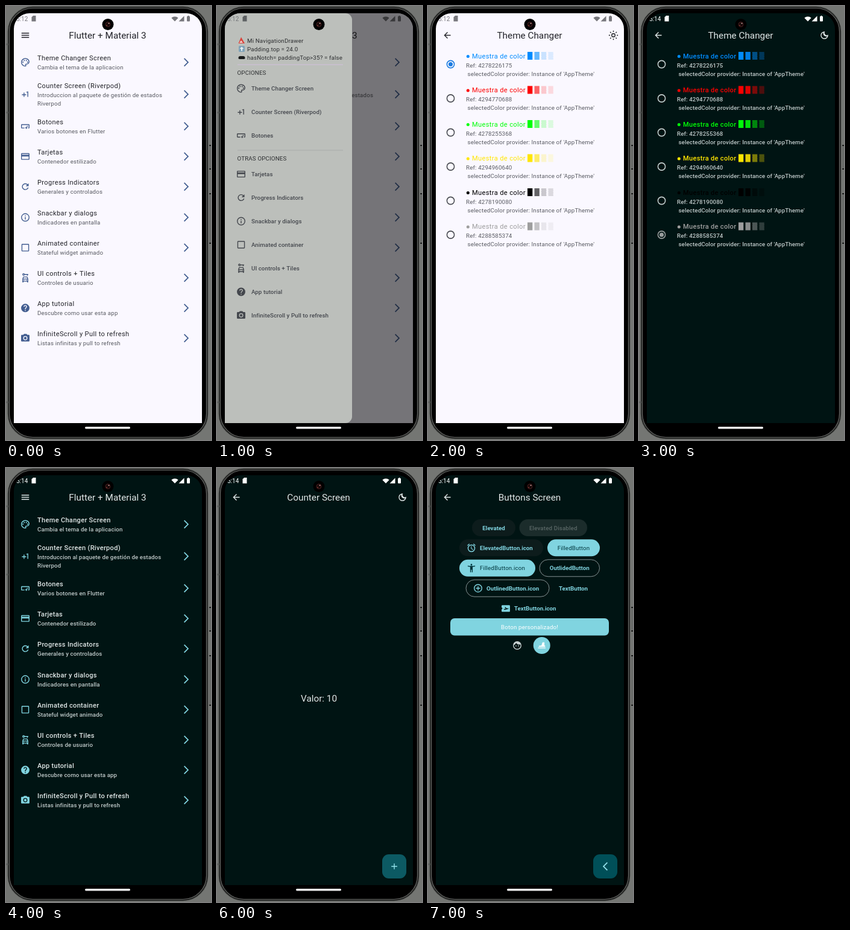
Write an HTML page with a canvas that moves like this. It is 340 by 719 pixels and loops after 8 s.

```html
<!DOCTYPE html>
<html lang="es">
<head>
<meta charset="utf-8">
<title>Material 3 demo</title>
<style>
html, body { margin: 0; width: 100%; height: 100%; overflow: hidden; background: #747673; }
canvas { display: block; width: 340px; height: 719px; }
</style>
</head>
<body>
<canvas id="stage"></canvas>
<script>
const W = 340, H = 719, STEP = 1000;
const canvas = document.getElementById('stage');
const ctx = canvas.getContext('2d');
const ratio = window.devicePixelRatio || 1;
canvas.width = W * ratio;
canvas.height = H * ratio;

const LIGHT = { bg: '#faf8ff', text: '#24252a', sub: '#585a61', accent: '#435e91', radio: '#4a4c53',
  picked: '#1a7be0', status: '#77777c', time: '5:12', mode: 'sun', shades: [1, .6, .16, .1],
  heading: { size: 11.12, gap: .35 }, body: { gap: .17 } };
const DARK = { bg: '#001413', text: '#e0e6e6', sub: '#c0c9c9', accent: '#80d4e0', radio: '#c3cccc',
  picked: '#9a9e9e', status: '#ffffff', time: '5:14', mode: 'moon', shades: [1, .88, .42, .25],
  heading: { size: 11.12, gap: .27, weight: 500 }, body: { gap: .1, weight: 500 } };

// Icons live on a 24-unit grid and are filled with the even-odd rule.
const disc = (x, y, r) => `M${x - r} ${y}a${r} ${r} 0 1 0 ${2 * r} 0a${r} ${r} 0 1 0 ${-2 * r} 0z`;
const ring = disc(12, 12, 10) + disc(12, 12, 8);
const icons = {
  menu: 'M3 18h18v-2H3zM3 13h18v-2H3zM3 6v2h18V6z',
  back: 'M20 11H7.83l5.59-5.59L12 4l-8 8 8 8 1.41-1.41L7.83 13H20z',
  next: 'M6.23 20.23 8 22l10-10L8 2 6.23 3.77 14.46 12z',
  prev: 'M17.77 3.77 16 2 6 12l10 10 1.77-1.77L9.54 12z',
  palette: 'M12 22C6.49 22 2 17.51 2 12S6.49 2 12 2s10 4.04 10 9c0 3.31-2.69 6-6 6h-1.77c-.28 0-.5.22-.5.5 0 .12.05.23.13.33.41.47.64 1.06.64 1.67A2.5 2.5 0 0 1 12 22zM12 4c-4.41 0-8 3.59-8 8s3.59 8 8 8c.28 0 .5-.22.5-.5a.54.54 0 0 0-.14-.35c-.41-.46-.63-1.05-.63-1.65a2.5 2.5 0 0 1 2.5-2.5H16c2.21 0 4-1.79 4-4 0-3.86-3.59-7-8-7z'
    + disc(6.5, 11.5, 1.5) + disc(9.5, 7.5, 1.5) + disc(14.5, 7.5, 1.5) + disc(17.5, 11.5, 1.5),
  plusOne: 'M10 8H8v4H4v2h4v4h2v-4h4v-2h-4zM14.5 6.08V7.9l2.5-.5V18h2V5z',
  button: 'M22 9v6c0 1.1-.9 2-2 2h-1v-2h1V9H4v6h6v2H4c-1.1 0-2-.9-2-2V9c0-1.1.9-2 2-2h16c1.1 0 2 .9 2 2zM14.5 19l1.09-2.41L18 15.5l-2.41-1.09L14.5 12l-1.09 2.41L11 15.5l2.41 1.09zM17 14l.62-1.38L19 12l-1.38-.62L17 10l-.62 1.38L15 12l1.38.62z',
  card: 'M20 4H4c-1.1 0-2 .9-2 2v12c0 1.1.9 2 2 2h16c1.1 0 2-.9 2-2V6c0-1.1-.9-2-2-2zM20 18H4v-6h16zM20 8H4V6h16z',
  refresh: 'M17.65 6.35C16.2 4.9 14.21 4 12 4c-4.42 0-8 3.58-8 8s3.58 8 8 8c3.73 0 6.84-2.55 7.73-6h-2.08c-.82 2.33-3.04 4-5.65 4-3.31 0-6-2.69-6-6s2.69-6 6-6c1.66 0 3.14.69 4.22 1.78L13 11h7V4z',
  info: ring + 'M11 7h2v2h-2zM11 11h2v6h-2z',
  box: 'M19 5v14H5V5zM19 3H5c-1.1 0-2 .9-2 2v14c0 1.1.9 2 2 2h14c1.1 0 2-.9 2-2V5c0-1.1-.9-2-2-2z',
  car: 'M10.83 3a3 3 0 1 0 0 2H16v2h2V5h1V3z' + disc(8, 4, 1)
    + 'M16.39 9H7.61c-.43 0-.81.28-.95.68l-1.66 5V21.5a1.5 1.5 0 0 0 3 0V21h8v.5a1.5 1.5 0 0 0 3 0v-6.82l-1.66-5c-.13-.4-.52-.68-.95-.68zM8.33 11h7.34l1 3H7.33zM17 19H7v-3h10z'
    + disc(9, 17.5, 1) + disc(15, 17.5, 1),
  help: disc(12, 12, 10) + 'M13 19h-2v-2h2zM15.07 11.25l-.9.92C13.45 12.9 13 13.5 13 15h-2v-.5c0-1.1.45-2.1 1.17-2.83l1.24-1.26c.37-.36.59-.86.59-1.41a2 2 0 0 0-4 0H8a4 4 0 0 1 8 0c0 .88-.36 1.68-.93 2.25z',
  camera: 'M9 2 7.17 4H4c-1.1 0-2 .9-2 2v12c0 1.1.9 2 2 2h16c1.1 0 2-.9 2-2V6c0-1.1-.9-2-2-2h-3.17L15 2z' + disc(12, 12, 5) + disc(12, 12, 3.2),
  sun: disc(12, 12, 5) + disc(12, 12, 3) + 'M1 11h3v2H1zM20 11h3v2h-3zM11 1h2v3h-2zM11 20h2v3h-2zM4.9 3.5l2.2 2.2-1.4 1.4-2.2-2.2zM18.3 16.9l2.2 2.2-1.4 1.4-2.2-2.2zM19.1 3.5l1.4 1.4-2.2 2.2-1.4-1.4zM5.7 16.9l1.4 1.4-2.2 2.2-1.4-1.4z',
  moon: 'M9.37 5.51A7.35 7.35 0 0 0 9.1 7.5a7.4 7.4 0 0 0 9.39 7.13A7 7 0 0 1 12 19c-3.86 0-7-3.14-7-7 0-2.93 1.81-5.45 4.37-6.49zM12 3a9 9 0 1 0 9 9c0-.46-.04-.92-.1-1.36a5.4 5.4 0 0 1-7.54-7.54c-.44-.06-.9-.1-1.36-.1z',
  alarm: 'M22 5.72l-4.6-3.86-1.29 1.53 4.6 3.86zM7.88 3.39 6.6 1.86 2 5.71l1.29 1.53zM12.5 8H11v6l4.75 2.85.75-1.23-4-2.37z' + disc(12, 13, 9) + disc(12, 13, 7),
  person: 'M20.5 6c-2.61.7-5.67 1-8.5 1s-5.89-.3-8.5-1L3 8c1.86.5 4 .83 6 1v13h2v-6h2v6h2V9c2-.17 4.14-.5 6-1z' + disc(12, 4, 2),
  addRing: ring + 'M13 7h-2v4H7v2h4v4h2v-4h4v-2h-4z',
  add: 'M19 13h-6v6h-2v-6H5v-2h6V5h2v6h6z',
  ticket: 'M20.2 4H4c-1.1 0-2 .9-2 2v4a2 2 0 0 1 0 4v4c0 1.1.9 2 2 2h16.2c1 0 1.8-.9 1.8-2V6c0-1.1-.8-2-1.8-2zM17.73 13.3l-8.86 2.36-1.66-2.88.93-.25 1.26.99 2.39-.64-2.4-4.16 1.4-.38 4.01 3.74 2.44-.65c.51-.14 1.04.17 1.18.68.13.51-.17 1.04-.69 1.19z',
  face: disc(12, 12, 10) + 'M12 20c-4.41 0-8-3.59-8-8 0-.29.02-.58.05-.86 2.36-1.05 4.23-2.98 5.21-5.37C11.07 8.33 14.05 10 17.42 10c.78 0 1.53-.09 2.25-.26.21.71.33 1.47.33 2.26 0 4.41-3.59 8-8 8z' + disc(9, 13, 1.25) + disc(15, 13, 1.25),
  sled: 'M2 19h20v2H2zM3 17l3-3h5l3-9h5v9h2v3z'
};
for (const key in icons) icons[key] = new Path2D(icons[key]);

function icon(name, x, y, color, size = 16.7) {
  ctx.save();
  ctx.translate(x - size / 2, y - size / 2);
  ctx.scale(size / 24, size / 24);
  ctx.fillStyle = color;
  ctx.fill(icons[name], 'evenodd');
  ctx.restore();
}

function text(str, x, y, color, { size = 9.73, weight = 400, gap = .17, align = 'left' } = {}) {
  ctx.font = `${weight} ${size}px Roboto, sans-serif`;
  ctx.letterSpacing = gap + 'px';
  ctx.textAlign = align;
  ctx.fillStyle = color;
  ctx.fillText(str, x, y);
}

function rect(x, y, w, h, color) {
  ctx.fillStyle = color;
  ctx.fillRect(x, y, w, h);
}

function round(x, y, w, h, r, fill, stroke, line = 1) {
  ctx.beginPath();
  ctx.roundRect(x, y, w, h, r);
  if (fill) { ctx.fillStyle = fill; ctx.fill(); }
  if (stroke) { ctx.strokeStyle = stroke; ctx.lineWidth = line; ctx.stroke(); }
}

function circle(x, y, r, fill, stroke, line = 1.6) {
  round(x - r, y - r, 2 * r, 2 * r, r, fill, stroke, line);
}

function shape(points, color) {
  ctx.beginPath();
  points.forEach(([x, y]) => ctx.lineTo(x, y));
  ctx.fillStyle = color;
  ctx.fill();
}

const menu = [
  ['palette', 'Theme Changer Screen', 'Cambia el tema de la aplicacion'],
  ['plusOne', 'Counter Screen (Riverpod)', 'Introduccion al paquete de gestión de estados', 'Riverpod'],
  ['button', 'Botones', 'Varios botones en Flutter'],
  ['card', 'Tarjetas', 'Contenedor estilizado'],
  ['refresh', 'Progress Indicators', 'Generales y controlados'],
  ['info', 'Snackbar y dialogs', 'Indicadores en pantalla'],
  ['box', 'Animated container', 'Stateful widget animado'],
  ['car', 'UI controls + Tiles', 'Controles de usuario'],
  ['help', 'App tutorial', 'Descubre como usar esta app'],
  ['camera', 'InfiniteScroll y Pull to refresh', 'Listas infinitas y pull to refresh']
];

function appBar(theme, title, leading, action) {
  text(title, 168.5, 54, theme.text, { size: 15.3, gap: 0, align: 'center' });
  icon(leading, 32, 48.5, theme.text);
  if (action) icon(action, 307.5, 48.5, theme.text);
}

function status(theme) {
  const c = theme.status;
  text(theme.time, 17, 24.5, c, { size: 10, gap: 0 });
  shape([[45, 16], [49.5, 16], [49.5, 25.5], [42.5, 25.5], [42.5, 18.5]], c);
  ctx.beginPath();
  ctx.moveTo(280, 25.5);
  ctx.arc(280, 25.5, 8, -Math.PI * .75, -Math.PI * .25);
  ctx.fillStyle = c;
  ctx.fill();
  shape([[295.5, 16.5], [295.5, 25.5], [286.5, 25.5]], c);
  round(300, 17, 5, 8.5, 1, c);
  rect(301.5, 16, 2, 1.5, c);
}

function home(theme) {
  appBar(theme, 'Flutter + Material 3', 'menu');
  menu.forEach(([name, title, sub, more], i) => {
    const y = i === 0 ? 93 : i === 1 ? 146 : Math.round(199 + (i - 2) * 50.2);
    const top = i === 1 ? 136 : y - 3;
    icon(name, 32, y + .3, theme.accent);
    icon('next', 299, y + .3, theme.accent);
    text(title, 52, top, theme.text, theme.heading);
    text(sub, 52, top + 15, theme.sub, theme.body);
    if (more) text(more, 52, top + 29, theme.sub, theme.body);
  });
}

function drawer() {
  home(LIGHT);
  status(LIGHT);
  rect(13, 12, 312, 679, 'rgba(0,0,0,.53)');
  round(13, 12, 211, 679, [0, 11, 11, 0], '#bcbfbb');
  text('5:12', 17, 24.5, '#74777a', { size: 10, gap: 0 });
  shape([[45, 16], [49.5, 16], [49.5, 25.5], [42.5, 25.5], [42.5, 18.5]], '#5d6062');

  const ink = '#2b2d2f', soft = '#44474d';
  shape([[40, 51.5], [46, 62], [35.5, 62]], '#d9443c');
  shape([[40, 57], [43, 61], [37, 61]], '#f0d4cf');
  round(36, 66, 10, 10, 1.5, '#7fa2b8');
  shape([[41, 67.5], [44.5, 71], [42, 71], [42, 74.5], [40, 74.5], [40, 71], [37.5, 71]], '#e6eef2');
  round(35.5, 83, 11, 5, [5.5, 5.5, 3, 3], '#17191a');
  ['Mi NavigationDrawer', 'Padding.top = 24.0', 'hasNotch= paddingTop>35? = false']
    .forEach((line, i) => text(line, 50, 60.7 + i * 14, ink));
  rect(34, 96.5, 175, 1.5, '#cbbfd2');
  text('OPCIONES', 33.5, 113.7, ink);
  rect(34, 238.5, 175, 1, '#a9acab');
  text('OTRAS OPCIONES', 33.5, 255.7, ink);
  menu.forEach(([name, title], i) => {
    const y = (i < 3 ? 136 : 161) + i * 39;
    icon(name, 40, y + .5, soft);
    text(title, 57, y + 4, soft, { weight: 500, gap: .07 });
  });
}

const swatches = [4278226175, 4294770688, 4278255368, 4294960640, 4278190080, 4288585374];

function themeScreen(theme, picked) {
  appBar(theme, 'Theme Changer', 'back', theme.mode);
  swatches.forEach((ref, i) => {
    const y = 96.5 + i * 56.5;
    const color = '#' + (ref - 0xff000000).toString(16).padStart(6, '0');
    const mark = i === picked ? theme.picked : theme.radio;
    circle(37.5, y, 6.1, null, mark);
    if (i === picked) circle(37.5, y, 3.5, mark);
    circle(66.3, y - 13, 2.5, color);
    text('Muestra de color', 73, y - 9.7, color, theme.heading);
    theme.shades.forEach((alpha, k) => {
      const x = 165 + k * 11.5, top = y - 20.5;
      ctx.globalAlpha = alpha;
      rect(x, top, 8.3, 13, color);
      if (k > 1) {
        for (let n = 0; n < 24; n++) rect(x + n % 4 * 2 + (n >> 2) % 2, top + 1 + (n >> 2) * 2, 1, 1, color);
      }
      ctx.globalAlpha = 1;
    });
    text('Ref: ' + ref, 63, y + 5, theme.sub, theme.body);
    text("selectedColor provider: Instance of 'AppTheme'", 65.5, y + 19, theme.sub, theme.body);
  });
}

function fab(name, fill) {
  round(274, 640, 40, 40, 11, fill);
  icon(name, 294, 660, '#93e2ec');
}

function counter(value) {
  appBar(DARK, 'Counter Screen', 'back', 'moon');
  text('Valor: ' + value, 169, 387, DARK.text, { size: 15.3, gap: 0, align: 'center' });
  fab('add', value ? '#0c5a63' : '#004f58');
}

function pill(x, right, y, caption, { fill, ink = DARK.accent, glyph, outline, weight = 600 } = {}) {
  if (fill || outline) round(x, y - 14, right - x, 28, 14, fill, outline);
  const font = { weight, gap: weight > 500 ? 0 : .14 };
  if (glyph) {
    icon(glyph, x + 20, y, ink);
    text(caption, x + 34, y + 3.6, ink, font);
  } else {
    text(caption, (x + right) / 2, y + 3.6, ink, { ...font, align: 'center' });
  }
}

function buttons() {
  const raised = '#0d1c1c', edge = '#879293', cyan = DARK.accent;
  const filled = { fill: cyan, ink: '#00363d', weight: 400 };
  appBar(DARK, 'Buttons Screen', 'back');
  pill(73, 145, 99, 'Elevated', { fill: raised });
  pill(151.5, 264, 99, 'Elevated Disabled', { fill: '#1b2c2b', ink: '#5a6766', weight: 500 });
  pill(52, 191, 132.3, 'ElevatedButton.icon', { fill: raised, glyph: 'alarm' });
  pill(198, 285, 132.3, 'FilledButton', filled);
  pill(52, 178, 165.8, 'FilledButton.icon', { ...filled, glyph: 'person' });
  pill(185, 284.5, 165.8, 'OutlidedButton', { outline: edge });
  pill(63, 201, 199.2, 'OutlinedButton.icon', { outline: edge, glyph: 'addRing' });
  pill(208, 274, 199.2, 'TextButton');
  pill(109, 225, 232.7, 'TextButton.icon', { glyph: 'ticket' });
  round(37, 249, 263, 28.5, 7, cyan);
  text('Boton personalizado!', 168.5, 266.8, '#fff', { align: 'center' });
  icon('face', 148, 294, '#c8d1d1');
  circle(188.7, 294, 14, cyan);
  icon('sled', 188.7, 293, '#fff', 15);
  fab('prev', '#004f58');
}

function phone() {
  rect(0, 0, W, H, '#747673');
  round(3.5, 1.5, 331, 715, 41, '#000', '#353735', 1.5);
  round(5.5, 3.5, 327, 711, 39, null, '#70726f', 1.2);
  for (const y of [62, 175, 655]) rect(1, y, 3, 3, '#555755');
  for (const [y, h] of [[230, 41], [310, 84]]) {
    rect(337, y, 3, h, '#686a68');
    rect(337, y, 3, 2, '#1c1d1c');
    rect(337, y + h - 2, 3, 2, '#1c1d1c');
  }
}

function lens() {
  circle(169, 30.5, 9.5, '#000');
  circle(169, 30.5, 4, '#160808', '#4a2020', 1);
  rect(169.5, 28, 2, 1.5, '#c9a9a4');
  rect(166.5, 31.5, 1.5, 1.5, '#8b4038');
}

const scenes = [
  [LIGHT, () => home(LIGHT)],
  [LIGHT, drawer],
  [LIGHT, () => themeScreen(LIGHT, 0)],
  [DARK, () => themeScreen(DARK, 5)],
  [DARK, () => home(DARK)],
  [DARK, () => counter(0)],
  [DARK, () => counter(10)],
  [DARK, buttons]
];

function draw(now) {
  const [theme, paint] = scenes[Math.floor(now / STEP) % scenes.length];
  ctx.setTransform(ratio, 0, 0, ratio, 0, 0);
  phone();
  ctx.save();
  ctx.beginPath();
  ctx.roundRect(13, 12, 312, 679, [26, 26, 0, 0]);
  ctx.clip();
  rect(13, 12, 312, 679, theme.bg);
  paint();
  if (paint !== drawer) status(theme);
  ctx.restore();
  lens();
  round(131, 697, 75, 3.5, 1.7, '#f4f4f4');
}

const start = performance.now();
function tick() {
  draw(performance.now() - start);
  requestAnimationFrame(tick);
}
tick();
</script>
</body>
</html>
```
